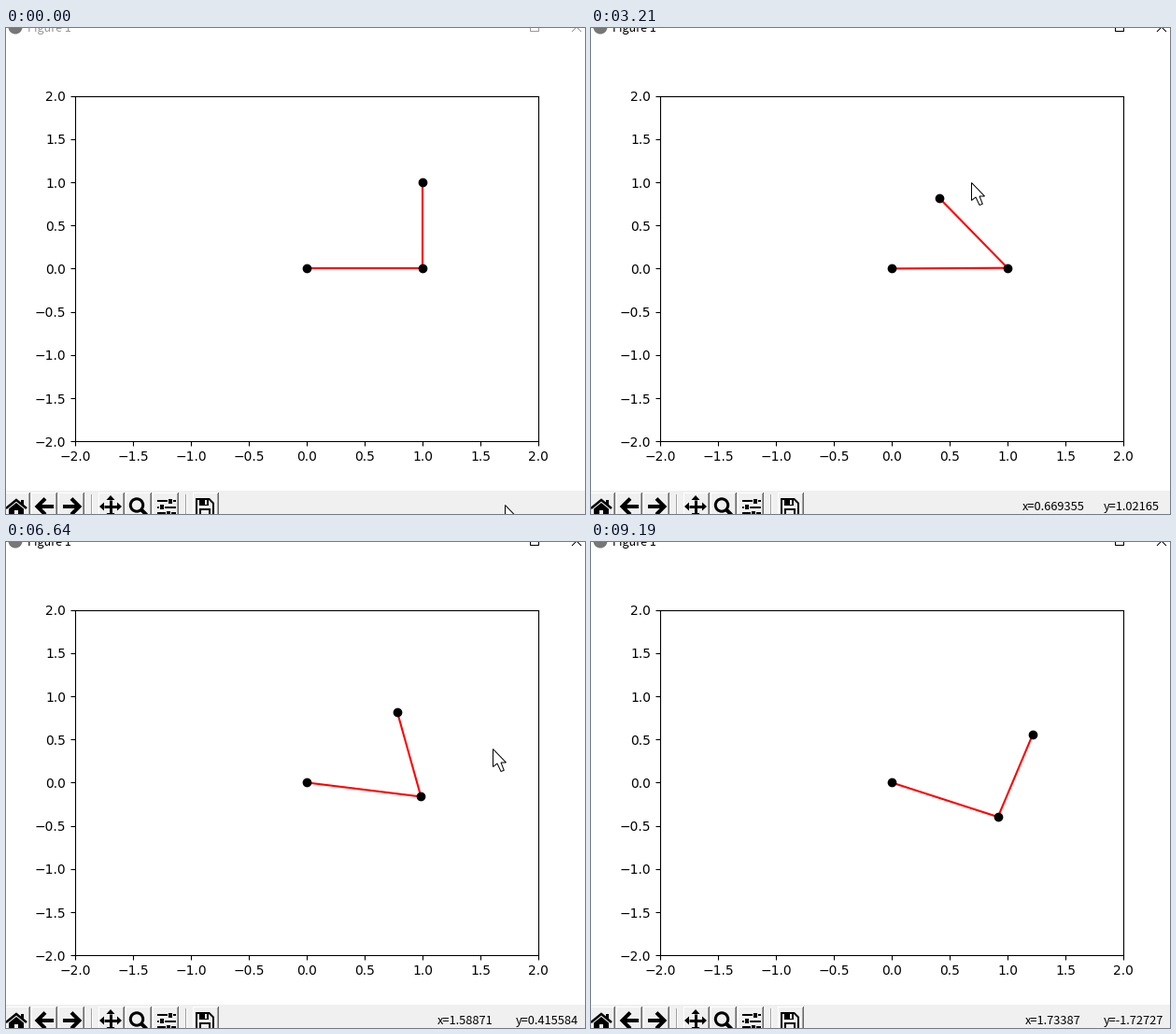
Write a matplotlib script that moves like this. It is 620x520 px and loops after 9270 ms.

```python
from itertools import pairwise

import numpy as np
import matplotlib.pyplot as plt
from matplotlib.animation import FuncAnimation
from matplotlib.patches import Circle, Polygon, Rectangle

W, H, DPI = 620, 520, 100
LOOP, STEP = 9270, 90
MOVE, REACH = 700, 1930            # longest mouse move, arm travel (ms)
PX = 72 / DPI                      # one pixel in points
CX, CY, SX, SY = 322, 257.4, 124, 92.4
UI_FONT = "Noto Sans CJK JP"
BAR, INK, FADED = "#f0f0f0", "black", "#999999"

# mouse stops: arrival ms, x, y, colour of the star if clicked there
STOPS = [
    (0, 532, 508, None), (450, 434, 398, None), (990, 373, 182, "black"),
    (1710, 389, 321, None), (3150, 405, 163, None), (3880, 419, 182, "#3c3cd0"),
    (4500, 453, 214, None), (5580, 465, 223, None), (6480, 521, 220, None),
    (7180, 473, 206, "#0000d8"), (7380, 512, 290, None),
    (9090, 537, 417, None), (9180, 545, 530, None),
]


def to_data(x, y):
    return (x - CX) / SX, (CY - y) / SY


def mouse_at(t):
    """Mouse pixel: wait at each stop, then ease over to the next."""
    for (t0, *a, _), (t1, *b, _) in pairwise(STOPS):
        if t < t1:
            u = max(0, 1 - (t1 - t) / min(MOVE, t1 - t0))
            s = u * u * (3 - 2 * u)
            return tuple(round(p + (q - p) * s) for p, q in zip(a, b))
    return STOPS[-1][1:3]


def solve(x, y):
    """Joint angles that put the tip of two unit links at x, y."""
    bend = np.arccos((x * x + y * y - 2) / 2)
    base = np.arctan2(y, x) - np.arctan2(np.sin(bend), 1 + np.cos(bend))
    return np.array([base, bend])


def arm_at(t):
    """Joint angles, star position and star colour."""
    q, star, color = np.array([0, np.pi / 2]), None, "black"
    for click, x, y, shade in STOPS:
        if shade and t >= click:
            star, color = to_data(x, y), shade
            goal = solve(*star)
            q = goal + (q - goal) * (1 - min(1, (t - click) / REACH)) ** 2
    return q, star, color


def build_states():
    """One state per frame; the readout keeps the last point inside the axes."""
    states, readout = [], None
    for t in range(0, LOOP, STEP):
        x, y = mouse_at(t)
        if 74 <= x <= 570 and 73 <= y <= 442:
            readout = [f"{v:g}" for v in to_data(x, y)]
        states.append(((x, y), readout, *arm_at(t)))
    return states


STATES = build_states()

fig = plt.figure(figsize=(W / DPI, H / DPI), dpi=DPI, facecolor="white")
ax = fig.add_axes([74 / W, 77.799 / H, 496 / W, 369.6 / H])
ax.set(xlim=(-2, 2), ylim=(-2, 2))
ui = fig.add_axes([0, 0, 1, 1], zorder=2)
ui.set(xlim=(0, W), ylim=(H, 0))
ui.axis("off")


def box(x, y, w, h, color):
    ui.add_patch(Rectangle((x, y), w, h, fc=color, lw=0))


def stroke(points, width=1, color=INK):
    return ui.plot(*zip(*points), color=color, lw=width * PX,
                   solid_capstyle="butt", solid_joinstyle="miter")[0]


def fill(points):
    ui.add_patch(Polygon(points, fc=INK, lw=0))


def ui_text(x, y, s, size, **kw):
    return ui.text(x, y, s, size=size * PX, family=UI_FONT, va="baseline", **kw)


def button(x0):
    box(x0, 497, 28, 23, "white")
    box(x0 + 1, 498, 27, 22, BAR)
    box(x0 + 26, 498, 1, 22, "#a0a0a0")
    box(x0 + 27, 497, 1, 23, "#696969")


def arrow(cx, d):
    stroke([(cx + d, 503.5), (cx - 7.5 * d, 512), (cx + d, 520.5)], 4)
    stroke([(cx - 6 * d, 512), (cx + 10 * d, 512)], 4)


def draw_title():
    ui.add_patch(Circle((10, -1), 7.5, fc="#777777", lw=0))
    return [
        ui_text(23, 4, "Figure 1", 12.6),
        stroke([(560.5, -5.5), (560.5, 2.5), (569.5, 2.5), (569.5, -5.5)]),
        stroke([(606, -6), (616, 4)]),
        stroke([(606, 4), (616, -6)]),
    ]


def draw_toolbar():
    box(0, 495, W, 25, BAR)
    for first, count in [(-2, 3), (99, 3), (200, 1)]:
        for n in range(count):
            button(first + 29.3 * n // 1)
    for x in (91, 192):
        box(x, 499, 1, 21, "#a0a0a0")
        box(x + 1, 499, 1, 21, "white")

    # home
    stroke([(0, 514), (11, 505), (22, 514)], 2.5)
    fill([(3, 521), (3, 514.5), (11, 508), (19, 514.5), (19, 521)])
    box(16, 505, 3, 5, INK)
    box(9, 516, 4, 5, BAR)
    # back, forward
    arrow(41, 1)
    arrow(71, -1)
    # pan
    for d in np.array([(1, 0), (-1, 0), (0, 1), (0, -1)]):
        tip = (112, 512) + 12 * d
        back, side = tip - 5 * d, 4.5 * d[::-1]
        fill([tip, back + side, back - side])
        stroke([(112, 512), back], 3)
    # zoom
    ui.add_patch(Circle((140, 510.5), 6.7, fill=False, ec=INK, lw=3 * PX))
    stroke([(144.5, 515), (151.5, 522)], 4)
    # sliders
    for y, knob in [(506, 174), (512.5, 165), (519, 172)]:
        box(162, y - 1, 20, 2, INK)
        box(knob - 1, y - 3, 6, 6, BAR)
        box(knob, y - 2.5, 4, 5, INK)
    # save
    stroke([(204, 521), (204, 504), (217.5, 504), (222, 508.5), (222, 521)], 2)
    box(207, 504, 10, 6.5, INK)
    box(212.5, 505, 2.5, 4.5, BAR)
    stroke([(208, 521), (208, 514.5), (218, 514.5), (218, 521)], 2)


draw_toolbar()
title_parts = draw_title()
x_text, y_text = (ui_text(0, 516, "", 12.8, ha="right") for _ in "xy")

SHAPE = np.array([(0, 0), (0, 19), (4.5, 15.5), (8.5, 24), (11.8, 22.8),
                  (8.5, 14.5), (14, 14.5)])
pointer = ui.add_patch(Polygon(SHAPE, fc="white", ec=INK, lw=PX, zorder=9))

links, = ax.plot([], [], "r-")
star_mark, = ax.plot([], [], "*", zorder=2.5)
joints, = ax.plot([], [], "ko", zorder=3)


def show_readout(readout):
    """Both values are padded to 12 characters with 4 px spaces."""
    if not readout:
        x_text.set_text("")
        y_text.set_text("")
        return
    x, y = readout
    right = 629 - 4 * (12 - len(y))
    y_text.set(text=f"y={y}", x=right)
    left = right - y_text.get_window_extent().width
    x_text.set(text=f"x={x}", x=left - 4 * (13 - len(x)))


def update(i):
    mouse, readout, (base, bend), star, color = STATES[i]
    elbow = np.cos(base), np.sin(base)
    tip = elbow[0] + np.cos(base + bend), elbow[1] + np.sin(base + bend)
    xs, ys = zip((0, 0), elbow, tip)
    links.set_data(xs, ys)
    joints.set_data(xs, ys)
    star_mark.set_data(*([[c] for c in star] if star else ([], [])))
    star_mark.set_color(color)
    pointer.set_xy(SHAPE + np.array(mouse) + 2.5)
    show_readout(readout)
    for part in title_parts:
        part.set_color(INK if star else FADED)
    return links, joints, star_mark, pointer, x_text, y_text, *title_parts


anim = FuncAnimation(fig, update, frames=len(STATES), interval=STEP,
                     repeat=True, repeat_delay=0)
plt.show()
```
